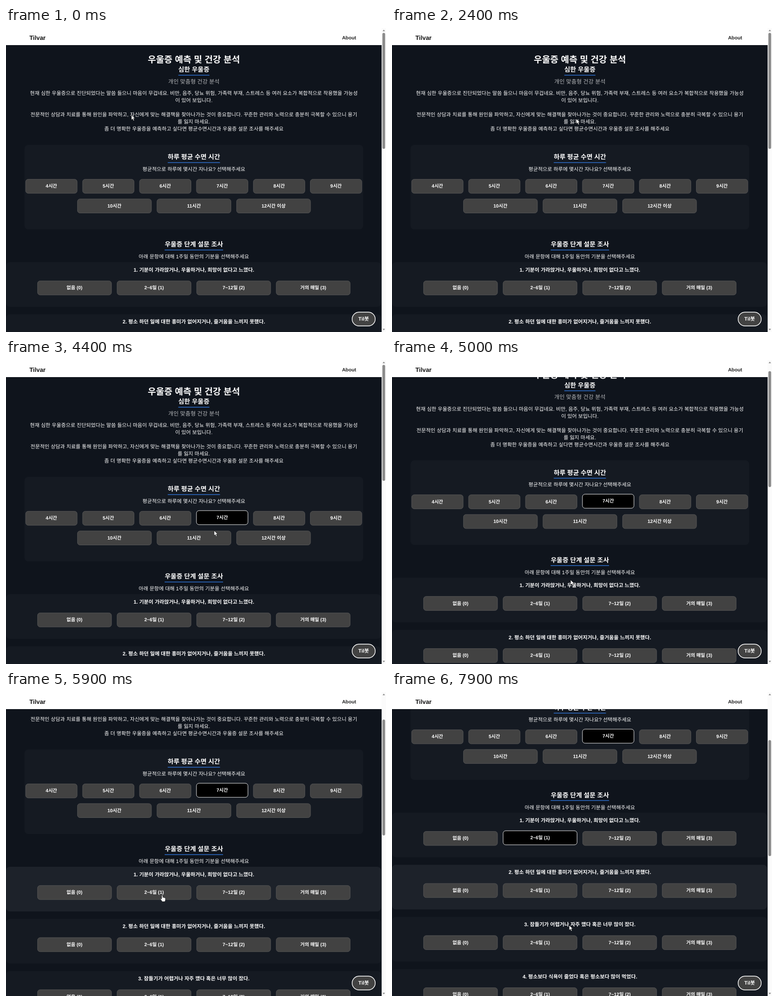
Recreate the animation shown at these times as an HTML page. Size 800 px wide and 640 px high, loop 8000 ms.

```html
<!DOCTYPE html>
<html lang="ko">
<head>
<meta charset="utf-8">
<title>우울증 예측 및 건강 분석</title>
<style>
html, body { margin: 0; width: 100%; height: 100%; overflow: hidden; background: #0f141c; }
svg { display: block; width: 800px; height: 640px; }
text {
  font-family: "Liberation Sans", "Noto Sans CJK KR", sans-serif;
  text-anchor: middle;
  text-rendering: geometricPrecision;
  fill: #fff;
}
</style>
</head>
<body>
<svg id="stage" viewBox="0 0 800 640" xmlns="http://www.w3.org/2000/svg"></svg>
<script>
const NS = 'http://www.w3.org/2000/svg';
const LOOP = 8000, STEP = 100;
const MID = 395.5;
const stage = document.getElementById('stage');

function add(parent, tag, attrs, content) {
  const el = document.createElementNS(NS, tag);
  for (const k in attrs) el.setAttribute(k, attrs[k]);
  if (content) el.textContent = content;
  parent.appendChild(el);
  return el;
}

function rect(parent, x, y, width, height, fill, rx = 0) {
  return add(parent, 'rect', { x, y, width, height, rx, fill });
}

// y is the visual middle of the line
function label(parent, str, x, y, size, bold, fill = '#fff') {
  return add(parent, 'text', {
    x, y: y + size * 0.37, 'font-size': size,
    'font-weight': bold ? 700 : 400, style: `fill:${fill}`
  }, str);
}

function heading(str, y, width) {
  label(page, str, MID, y, 13.46, true);
  rect(page, MID - width / 2, y + 11.2, width, 1.4, '#2f73d6');
}

const body = 10.79;
const buttons = [], panels = [];

function button(str, x, y, w, hover, edge) {
  const g = add(page, 'g', {});
  const box = add(g, 'rect', { x: x + .4, y: y + .4, width: w - .8, height: 29.6, rx: 5.5, 'stroke-width': .9 });
  label(g, str, x + w / 2, y + 14.6, 10, true);
  const b = { g, box, x, y, w, h: 30.4, hover, edge, pick: Infinity };
  buttons.push(b);
  return b;
}

rect(stage, 0, 0, 800, 640, '#0f141c');
const page = add(stage, 'g', {});

// Result summary
label(page, '우울증 예측 및 건강 분석', MID, 66, 18.84, true);
heading('심한 우울증', 87.5, 65.6);
label(page, '개인 맞춤형 건강 분석', MID, 112.5, 11.85, false, '#b4b6b9');
[
  [137.5, '현재 심한 우울증으로 진단되었다는 말씀 들으니 마음이 무겁네요. 비만, 음주, 당뇨 위험, 가족력 부재, 스트레스 등 여러 요소가 복합적으로 작용했을 가능성'],
  [152.5, '이 있어 보입니다.'],
  [182.5, '전문적인 상담과 치료를 통해 원인을 파악하고, 자신에게 맞는 해결책을 찾아나가는 것이 중요합니다. 꾸준한 관리와 노력으로 충분히 극복할 수 있으니 용기'],
  [197.5, '를 잃지 마세요.'],
  [212.5, '좀 더 명확한 우울증을 예측하고 싶다면 평균수면시간과 우울증 설문 조사를 해주세요']
].forEach(([y, s]) => label(page, s, MID, y, body));

// Sleep hours
rect(page, 39, 246, 713, 178, '#151a22', 8);
heading('하루 평균 수면 시간', 271.5, 110);
label(page, '평균적으로 하루에 몇시간 자나요? 선택해주세요', MID, 297, body);
const grey = [85, 85, 85], rim = [104, 104, 104];
for (let i = 0; i < 6; i++) button(`${i + 4}시간`, 41 + i * 119.85, 318, 109.2, grey, rim);
['10시간', '11시간', '12시간 이상'].forEach((s, i) => button(s, 150 + i * 167.5, 359.5, 156.5, grey, rim));
buttons[3].pick = 4000;

// Questionnaire
heading('우울증 단계 설문 조사', 455.5, 123);
label(page, '아래 문항에 대해 1주일 동안의 기분을 선택해주세요', MID, 481.5, body);
[
  '기분이 가라앉거나, 우울하거나, 희망이 없다고 느꼈다.',
  '평소 하던 일에 대한 흥미가 없어지거나, 즐거움을 느끼지 못했다.',
  '잠들기가 어렵거나 자주 깼다 혹은 너무 많이 잤다.',
  '평소보다 식욕이 줄었다 혹은 평소보다 많이 먹었다.'
].forEach((q, n) => {
  const y = 493 + n * 109.7;
  const box = rect(page, 0, y, 789.5, 94, '#151a22', 8);
  panels.push({ box, x: 0, y, w: 789.5, h: 94 });
  label(page, `${n + 1}. ${q}`, MID, y + 15.7, body, true);
  ['없음 (0)', '2~6일 (1)', '7~12일 (2)', '거의 매일 (3)'].forEach((s, i) => {
    const b = button(s, 66 + i * 167.5, y + 39, 156.5, [40, 49, 58], [160, 166, 172]);
    if (n === 0 && i === 1) b.pick = 7450;
  });
});

// Fixed chrome
rect(stage, 0, 0, 791, 36, '#fff');
label(stage, 'Tilvar', 66.3, 20.5, 12.9, true, '#111');
label(stage, 'About', 722.3, 20, 10.3, true, '#222');
add(stage, 'rect', { x: 728.7, y: 598.2, width: 48.6, height: 29, rx: 14.5, fill: '#424242', stroke: '#fff', 'stroke-width': 1.4 });
label(stage, 'Til봇', 753, 612.3, body, true);
rect(stage, 790.8, 0, 9.2, 640, '#fbfbfb');
add(stage, 'path', { d: 'M792.8 6.8L795.4 3.6L798 6.8ZM792.8 633.2L795.4 636.4L798 633.2Z', fill: '#8a8a8a' });
const thumb = rect(stage, 792.4, 10.3, 5.8, 244, '#8b8b8b', 2.9);

const arrow = add(stage, 'path', {
  d: 'M0 0V10.6L2.5 8.3L4.2 12.2L6.1 11.4L4.4 7.6H7.7Z',
  fill: '#fff', stroke: '#111', 'stroke-width': .7, 'stroke-linejoin': 'round'
});
const hand = add(stage, 'path', {
  d: 'M-1.3 .8C-1.3 -.5 1.1 -.5 1.1 .8V4.6C1.6 4 2.9 4.1 3.1 5C3.7 4.5 4.9 4.7 5.1 5.6C5.8 5.2 6.7 5.7 6.7 6.6V9.4C6.7 11 5.8 11.7 5.6 13.3H-.4C-.8 11.5 -2.6 10.2 -3.7 7.9C-4 6.9 -2.7 6.3 -2 7.2L-1.3 8Z',
  fill: '#fff', stroke: '#111', 'stroke-width': .7, 'stroke-linejoin': 'round'
});

// Pointer stops: time, x, y
const path = [
  [0, 264, 183], [200, 264, 183], [1200, 430, 135], [1400, 430, 135], [1600, 437, 128],
  [2300, 395, 185], [3100, 233, 331], [3200, 231, 334], [3350, 233, 334], [3850, 452, 336],
  [4250, 452, 336], [4800, 376, 463], [5250, 376, 463], [5500, 364, 455], [5800, 335, 440],
  [5900, 329, 428], [6700, 345, 425], [7200, 354, 423], [7480, 354, 423], [7680, 373, 491], [8000, 373, 491]
];

const clamp = v => Math.max(0, Math.min(1, v));
const ease = v => { v = clamp(v); return v * v * (3 - 2 * v); };
const mix = (a, b, k) => a.map((v, i) => v + (b[i] - v) * k);
const rgb = c => `rgb(${c.map(Math.round)})`;

function pointer(t) {
  t = Math.max(0, t);
  let i = 1;
  while (i < path.length - 1 && path[i][0] < t) i++;
  const [t0, x0, y0] = path[i - 1], [t1, x1, y1] = path[i];
  const k = ease((t - t0) / (t1 - t0));
  return [x0 + (x1 - x0) * k, y0 + (y1 - y0) * k];
}

const scrollAt = t => 125 * (ease((t - 4896) / 300) + ease((t - 7655) / 300));

// Hover is only re-evaluated once a scroll has come to rest
function over(b, t) {
  const [x, y] = pointer(t);
  const py = y + (t < 5200 ? 0 : 125);
  return x >= b.x && x <= b.x + b.w && py >= b.y && py <= b.y + b.h;
}

function glow(b, t) {
  let sum = 0;
  for (let d = 80; d <= 240; d += 40) sum += over(b, t - d);
  return sum / 5;
}

function draw(t) {
  const scroll = scrollAt(t);
  page.setAttribute('transform', `translate(0 ${-scroll})`);
  thumb.setAttribute('y', 10.3 + scroll * .381);

  for (const p of panels) {
    p.box.setAttribute('fill', rgb(mix([21, 26, 34], [29, 34, 42], glow(p, t))));
  }
  for (const b of buttons) {
    const h = glow(b, t), s = clamp((t - b.pick) / 200);
    b.box.setAttribute('fill', rgb(mix(mix([66, 66, 66], b.hover, h), [0, 0, 0], s)));
    b.box.setAttribute('stroke', rgb(mix(mix([88, 88, 88], b.edge, h), [255, 255, 255], s)));
    b.g.setAttribute('transform', `translate(0 ${-1.3 * Math.max(h, s)})`);
  }

  const [x, y] = pointer(t);
  const onButton = buttons.some(b => over(b, t));
  arrow.setAttribute('visibility', onButton ? 'hidden' : 'visible');
  hand.setAttribute('visibility', onButton ? 'visible' : 'hidden');
  (onButton ? hand : arrow).setAttribute('transform', `translate(${x} ${y})`);
}

const start = performance.now();
function tick() {
  const t = (performance.now() - start) % LOOP;
  draw(Math.floor(t / STEP) * STEP);
  requestAnimationFrame(tick);
}
tick();
</script>
</body>
</html>
```
